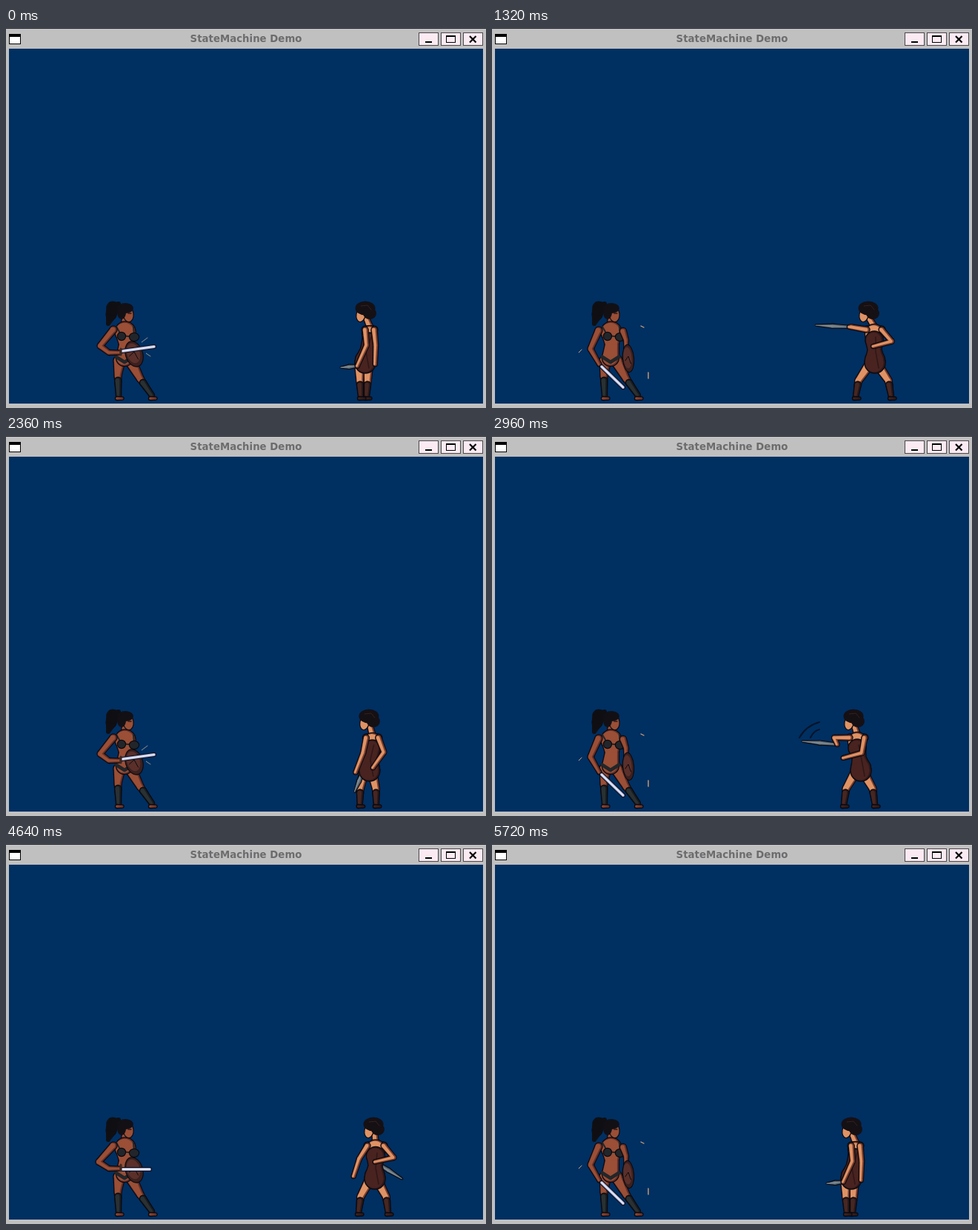
Recreate the animation shown at these times as an HTML page with a canvas. Size 648x514 px, loop 5.8 s.

```html
<!DOCTYPE html>
<html lang="en">
<head>
<meta charset="utf-8">
<title>StateMachine Demo</title>
<style>
html, body { margin: 0; width: 100%; height: 100%; overflow: hidden; background: #c0c0c0; }
canvas { position: absolute; left: 0; top: 0; }
h1 {
  position: absolute; left: 0; top: 1px; width: 648px; margin: 0;
  font: bold 13.333px/28px "DejaVu Sans", sans-serif;
  color: #6c6c6e; text-align: center;
}
</style>
</head>
<body>
<canvas id="stage" width="648" height="514"></canvas>
<h1>StateMachine Demo</h1>
<script>
const ctx = document.getElementById('stage').getContext('2d');
const LOOP = 5800, INK = '#0a0a10';
const mix = (a, b, k) => a + (b - a) * k;
const between = (p, q, k) => [mix(p[0], q[0], k), mix(p[1], q[1], k)];
const polar = ([x, y], deg, len) => {
  const a = deg * Math.PI / 180;
  return [x + Math.cos(a) * len, y + Math.sin(a) * len];
};

function rect(col, x, y, w, h) {
  ctx.fillStyle = col;
  ctx.fillRect(x, y, w, h);
}

function line(col, width, ...pts) {
  ctx.beginPath();
  pts.forEach(p => ctx.lineTo(...p));
  ctx.strokeStyle = col;
  ctx.lineWidth = width;
  ctx.stroke();
}

function oval(col, x, y, rx, ry, tilt = 0) {
  ctx.beginPath();
  ctx.ellipse(x, y, rx, ry, tilt, 0, 7);
  ctx.fillStyle = col;
  ctx.fill();
}

function inked(col, x, y, rx, ry, tilt) {
  oval(INK, x, y, rx + 1.2, ry + 1.2, tilt);
  oval(col, x, y, rx, ry, tilt);
}

// Rounded shape along a path, one width per point
function chain(col, pts, widths, grow = 0, dx = 0) {
  ctx.fillStyle = col;
  pts.forEach(([x, y], i) => {
    const r = Math.max(0.3, widths[i] / 2 + grow);
    oval(col, x + dx, y, r, r);
    if (!i) return;
    const [px, py] = pts[i - 1], pr = Math.max(0.3, widths[i - 1] / 2 + grow);
    const len = Math.hypot(x - px, y - py) || 1;
    const nx = (py - y) / len, ny = (x - px) / len;
    ctx.beginPath();
    ctx.moveTo(px + nx * pr + dx, py + ny * pr);
    ctx.lineTo(x + nx * r + dx, y + ny * r);
    ctx.lineTo(x - nx * r + dx, y - ny * r);
    ctx.lineTo(px - nx * pr + dx, py - ny * pr);
    ctx.fill();
  });
}

// Outline, shadow, then a lit core nearer the left edge
function shape([lit, dark], pts, widths) {
  chain(INK, pts, widths, 1.2);
  chain(dark, pts, widths);
  chain(lit, pts, widths, -1.2, -0.8);
}

function leg(skin, boot, hip, knee, foot, thigh, toe) {
  shape(skin, [hip, knee, foot], [thigh, 9, 5]);
  shape(boot, [between(knee, foot, 0.25), foot], [8, 6]);
  shape(toe, [[foot[0] - 2, 501], [foot[0] + 5, 501]], [4, 3]);
}

function button(x) {
  rect('#4c474b', x, 6, 27, 18);
  rect('#fbeaf2', x + 1, 7, 25, 16);
}

function drawWindow() {
  rect('#c0c0c0', 0, 0, 648, 514);
  rect('#20222c', 0, 0, 648, 1);
  rect('#002f62', 4, 28, 640, 480);
  rect('#000', 4, 8, 16, 14);
  rect('#fff', 5, 12, 14, 9);
  [557, 587, 617].forEach(button);
  rect('#000', 566, 18, 9, 2);
  rect('#000', 594, 10, 13, 10);
  rect('#fbeaf2', 595, 12, 11, 7);
  ctx.lineCap = 'butt';
  line('#000', 2.2, [626, 11], [634.5, 19.5]);
  line('#000', 2.2, [634.5, 11], [626, 19.5]);
  ctx.lineCap = 'round';
}

const TAN = ['#9a4f36', '#642f27'], GREAVE = ['#2a3133', '#191d21'];
const WOOD = ['#5b302a', '#3b201f'], CLOTH = '#22262a', STEEL = ['#c3cbe8', '#9aa3cc'];

function shield(x, y, rx, ry, tilt) {
  inked(WOOD[1], x, y, rx, ry, tilt);
  oval(WOOD[0], x - 1, y - 1, rx * 0.8, ry * 0.8, tilt);
  line(INK, 1, [x - rx * 0.6, y + 3], [x, y - 3], [x + rx * 0.5, y + 7]);
}

function sword(from, to) {
  line(INK, 6, from, to);
  line(STEEL[1], 4, from, to);
  line('#e4e8f8', 2, from, to);
}

function drawGuard(pose) {
  const down = pose === 'down', shine = pose === 'shine';
  leg(TAN, GREAVE, [168, 450], [181, 474], [197, 497], 15, TAN);
  leg(TAN, GREAVE, [153, 450], [151, 470], [152, 497], 15, TAN);

  // ponytail, trunk and outfit
  chain('#0f0f13', [[152, 373], [144, 378], [142, 388], [138, 400]], [6, 17, 15, 6]);
  shape(TAN, [[161, 395], [161, 403]], [9, 10]);
  shape(TAN, [[161, 411], [162, 428], [160, 446]], [27, 18, 22]);
  line(CLOTH, 2, [149, 404], [156, 416], [173, 418], [172, 404]);
  inked(CLOTH, 156, 417, 5, 5);
  inked(CLOTH, 173, 418, 6, 5);
  line(CLOTH, 5, [149, 445], [160, 452], [171, 445]);

  // head
  inked(TAN[0], 165, 387, 6.5, 10, -0.15);
  oval('#121015', 161, 379, 11, 7);
  oval('#121015', 156, 385, 6, 9);
  line('#2b1718', 1.4, [165, 386], [169, 386]);

  if (down) {
    shape(TAN, [[177, 410], [181, 422], [181, 434]], [8, 6, 5]);
    shield(184, 447, 7, 18, -0.08);
    shape(TAN, [[144, 409], [133, 434], [145, 455]], [9, 7, 5]);
    sword([148, 458], [177, 486]);
    line('#cfa46f', 1.3, [201, 403], [205, 405]);
    line('#c1ab75', 1, [117, 439], [121, 435]);
    line('#dfa970', 1.3, [211, 466], [211, 474]);
    return;
  }
  shield(173, 441, 11, 17, -0.3);
  shape(TAN, [[145, 408], [shine ? 127 : 125, 430], [139, 439], [153, 439]], [9, 7, 6, 5]);
  sword([157, shine ? 437 : 440], shine ? [200, 431] : [194, 440]);
  line('#3c2924', 3, [155, 434], [155, 442]);
  if (shine) {
    line('#8f9a86', 1, [183, 425], [191, 419]);
    line('#8f9a86', 1, [189, 440], [195, 444]);
  }
}

// Angles in degrees, clockwise from the right. hand: 0 lead, 1 trailing
const STAND = { hip: 485, chest: 491, head: 485, turn: 6, stride: 3, upper: 85, fore: 114,
                reach: 31, upper2: 84, fore2: 92, blade: 175, length: 22, hand: 0 };
const WINDUP = { hip: 498, chest: 499, head: 496, turn: 11, stride: 19, upper: 122, fore: 108,
                 reach: 25, upper2: 50, fore2: 167, blade: 32, length: 43, hand: 1 };
const STRIKE = { hip: 498, chest: 493, head: 488, turn: 10, stride: 20, upper: 180, fore: 66,
                 reach: 10, upper2: 100, fore2: 165, blade: 185, length: 47, hand: 0 };
const THRUST = { hip: 517, chest: 516, head: 508, turn: 10, stride: 23, upper: 190, fore: 180,
                 reach: 3, upper2: 49, fore2: 165, blade: 183, length: 45, hand: 0 };
const REST = { hip: 489, chest: 492, head: 491, turn: 1, stride: 2, upper: 87, fore: 116,
               reach: 30, upper2: 87, fore2: 116, blade: 173, length: 37, hand: 0 };

const CYCLE = 1920;
const KEYS = [[0, STAND], [100, STAND], [780, WINDUP], [1020, STRIKE],
              [1300, THRUST], [1820, REST], [1866, STAND], [CYCLE, STAND]];
const PEACH = ['#df9365', '#7a3e2e'], DRESS = ['#482320', '#2f1719'], HAIR = '#151014';
const BOOT = ['#472722', '#29181a'], IRON = ['#7c8992', '#55616c'];

function poseAt(p) {
  const i = KEYS.findIndex(key => p < key[0]) - 1;
  const [t0, a] = KEYS[i], [t1, b] = KEYS[i + 1];
  const n = Math.max(1, Math.round((t1 - t0) / 80));
  const k = Math.floor((p - t0) / (t1 - t0) * n) / n;
  return Object.fromEntries(Object.keys(a).map(key => [key, mix(a[key], b[key], k)]));
}

function drawRival(p) {
  const m = poseAt(p);
  const arm = (side, upper, fore, reach) => {
    const shoulder = [m.chest + side * m.turn, 408];
    const elbow = polar(shoulder, upper, 21);
    return [shoulder, elbow, polar(elbow, fore, reach)];
  };
  const lead = arm(-1, m.upper, m.fore, m.reach);
  const trail = arm(1, m.upper2, m.fore2, 26);
  const drawArm = pts => shape(PEACH, pts, [7, 6, 5]);

  for (const side of [1, -1]) {
    const at = (dx, y) => [m.hip - 2 + side * dx, y];
    leg(PEACH, BOOT, at(6, 456), at(m.stride * 0.75 + 3, 477), at(m.stride + 1, 499), 12, BOOT);
  }

  const grip = between(lead[2], trail[2], m.hand);
  shape(IRON, [grip, polar(grip, m.blade, m.length / 2), polar(grip, m.blade, m.length)], [3, 5, 1]);

  // neck, shoulders and dress
  const girth = 14 + m.turn;
  shape(PEACH, [[m.head + 2, 394], [m.chest, 404]], [7, 8]);
  shape(PEACH, [[m.chest - m.turn, 408], [m.chest + m.turn, 408]], [9, 9]);
  shape(PEACH, [[m.chest, 413], [m.chest, 422]], [girth, girth - 2]);
  shape(DRESS, [[m.chest, 422], [mix(m.chest, m.hip, 0.5), 435], [m.hip, 449], [m.hip, 453]],
        [girth - 1, 18, 26, 27]);
  line(DRESS[1], 1.5, [m.chest + 2, 418], [m.hip + 1, 438], [m.hip + 5, 460]);
  drawArm(trail);
  drawArm(lead);

  // head with rolled hair
  inked(PEACH[0], m.head - 6, 388, 5.5, 9, 0.15);
  oval(HAIR, m.head, 379, 13.5, 9.5);
  oval(HAIR, m.head + 6, 386, 9, 8);
  line('#35211f', 1, [m.head - 6, 376], [m.head + 3, 375], [m.head + 8, 381]);

  if (p >= 1020 && p < 1120) {
    for (const s of [1, 0.45]) {
      ctx.beginPath();
      ctx.moveTo(442 - 27 * s, 408);
      ctx.quadraticCurveTo(442 - 18 * s, 405 - 13 * s, 442, 405 - 18 * s);
      ctx.lineWidth = 2;
      ctx.strokeStyle = '#071427';
      ctx.stroke();
    }
  }
}

function draw(t) {
  const g = t % 392;
  drawWindow();
  ctx.lineJoin = ctx.lineCap = 'round';
  drawGuard(g >= 132 && g < 264 ? 'down' : g >= 264 && g < 346 ? 'level' : 'shine');
  drawRival(t % CYCLE);
}

const start = performance.now();
function tick() {
  draw((performance.now() - start) % LOOP);
  requestAnimationFrame(tick);
}
tick();
</script>
</body>
</html>
```
